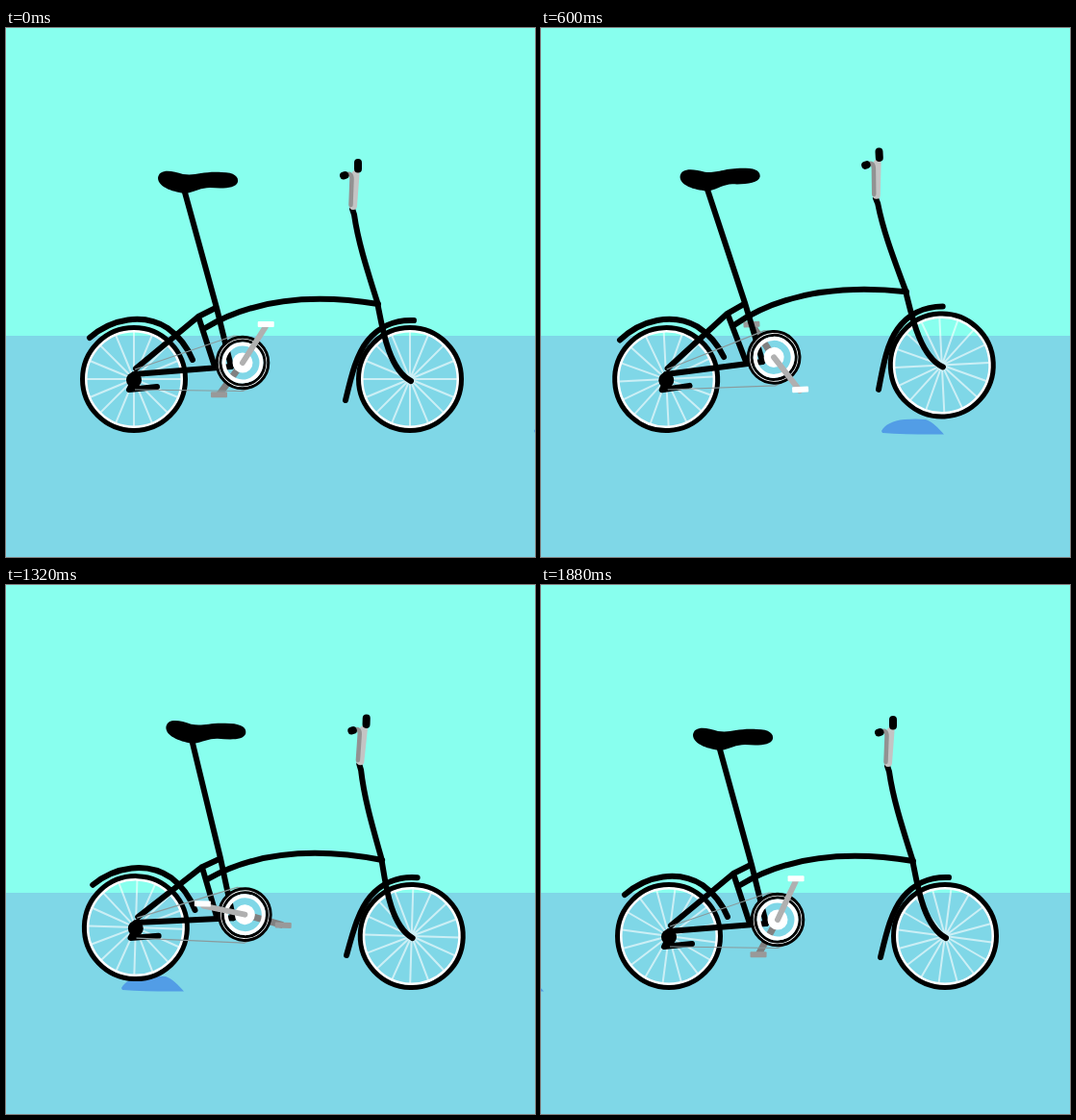
An HTML page that plays this animation: 550 px wide and 550 px high, repeating every 1920 ms.

```html
<!DOCTYPE html>
<html lang="en">
<head>
<meta charset="utf-8">
<title>Bicycle over a bump</title>
<style>
  html, body { margin: 0; width: 100%; height: 100%; overflow: hidden; background: #88ffee; }
  svg { display: block; width: 100vw; height: 100vh; }
  .line { fill: none; stroke: #000; stroke-width: 6; stroke-linecap: round; stroke-linejoin: round; }
</style>
</head>
<body>
<svg viewBox="0 0 550 550">
  <defs>
    <g id="wheel" fill="none">
      <g id="spokes" stroke="#fff" stroke-opacity=".6" stroke-width="2"></g>
      <circle r="50" stroke="#fff" stroke-width="3"/>
      <circle r="53.5" stroke="#000" stroke-width="5"/>
    </g>
  </defs>

  <rect width="550" height="550" fill="#88ffee"/>
  <rect y="320" width="550" height="230" fill="#7fd7e7"/>
  <path id="bump" fill="#529de6" d="M0 419C3 413 11 408 24 407Q36 406 46 407C54 410 59 416 65 422.500Q30 423 1 421Z"/>

  <g id="bike">
    <g id="farCrank">
      <path stroke="#808080" stroke-width="7" d="M246 348V307"/>
      <rect class="pedal" x="-8.500" y="-3" width="17" height="6" rx="1" fill="#999"/>
    </g>

    <use href="#wheel" x="133" y="365"/>
    <use href="#wheel" x="420" y="365"/>

    <g class="line">
      <!-- mudguards -->
      <path d="M87 322C110 302 143 296 168 312C182 322 189 333 194 345"/>
      <path d="M424 304C404 303 387 311 376 325C364 340 359 362 353 387"/>
      <!-- frame -->
      <path d="M135 354L200 300L218 291M200 300L217 352M133 360L234 352"/>
      <path d="M186 171L219 291L234 352"/>
      <path d="M207 312C260 280 325 277 387 287"/>
      <path d="M360 188L362 194C366 222 375 250 386 285C391 310 397 354 421 367"/>
      <path d="M133 366L128 376L157 373"/>
    </g>
    <circle cx="133" cy="366" r="8"/>
    <path d="M158 156C159 146 172 148 184 152C198 154 203 149 224 150C238 150 242 155 241 160C239 167 225 167 212 166C203 166 197 170 187 172C176 171 158 166 158 156Z"/>

    <!-- handlebar -->
    <g fill="none" stroke-linecap="round">
      <path stroke="#c4c4c4" stroke-width="8" d="M363.500 152L361 185"/>
      <path stroke="#929292" stroke-width="4.500" d="M354 152.500Q359.500 150 359.500 157L358.500 184"/>
      <path stroke="#000" stroke-width="8" d="M366 140V146.500M351 153.500L352.500 153"/>
    </g>

    <!-- chain and chainring -->
    <g fill="none">
      <path stroke="#8a9a9c" stroke-width="1.200" d="M134 355L237 320A29.500 29.500 0 0 1 246 377.500L134 376"/>
      <g transform="translate(246 348)">
        <circle r="25" stroke="#fff" stroke-width="1.500"/>
        <circle r="26.800" stroke="#000" stroke-width="3"/>
        <circle r="23" stroke="#000" stroke-width="3"/>
        <circle r="19.500" stroke="#fff" stroke-width="4"/>
      </g>
    </g>
    <circle cx="246" cy="348" r="10.500" fill="#fff"/>

    <g id="nearCrank">
      <path stroke="#b0b0b0" stroke-width="6" stroke-linecap="round" d="M246 348V304"/>
      <rect class="pedal" x="-8.500" y="-5" width="17" height="6" rx="1" fill="#fff"/>
    </g>
  </g>
</svg>

<script>
const LOOP = 1920, STEP = 40, SPOKES = 16;
const $ = id => document.getElementById(id);
const put = (el, transform) => el.setAttribute('transform', transform);

let spokePath = '';
for (let i = 0; i < SPOKES; i++) {
  const a = i * 2 * Math.PI / SPOKES;
  spokePath += `M0 0L${49 * Math.cos(a)} ${49 * Math.sin(a)}`;
}
$('spokes').innerHTML = `<path d="${spokePath}"/>`;

// smooth rise and fall around a peak time
const hop = (t, peak) =>
  Math.abs(t - peak) < 160 ? (1 + Math.cos(Math.PI * (t - peak) / 160)) / 2 : 0;

// the arm turns, the pedal stays level
function turnCrank(id, angle, length) {
  const crank = $(id), a = angle * Math.PI / 180;
  put(crank.querySelector('path'), `rotate(${angle} 246 348)`);
  put(crank.querySelector('.pedal'),
    `translate(${246 + length * Math.sin(a)} ${348 - length * Math.cos(a)})`);
}

function draw(now) {
  const t = Math.floor(now % LOOP / STEP) * STEP;
  const turn = 360 * t / LOOP;

  put($('bump'), `translate(${549 - 0.325 * t} 0)`);
  put($('spokes'), `rotate(${2 * turn})`);
  turnCrank('nearCrank', 32.6 + turn, 45);
  turnCrank('farCrank', 216.3 + turn, 41.4);

  // tip about the wheel that stays on the ground
  const lift = -2.9 * hop(t, 600), kick = 3.3 * hop(t, 1396);
  put($('bike'), `rotate(${lift} 133 421) rotate(${kick} 420 421)`);

  requestAnimationFrame(draw);
}
draw(0);
</script>
</body>
</html>
```
